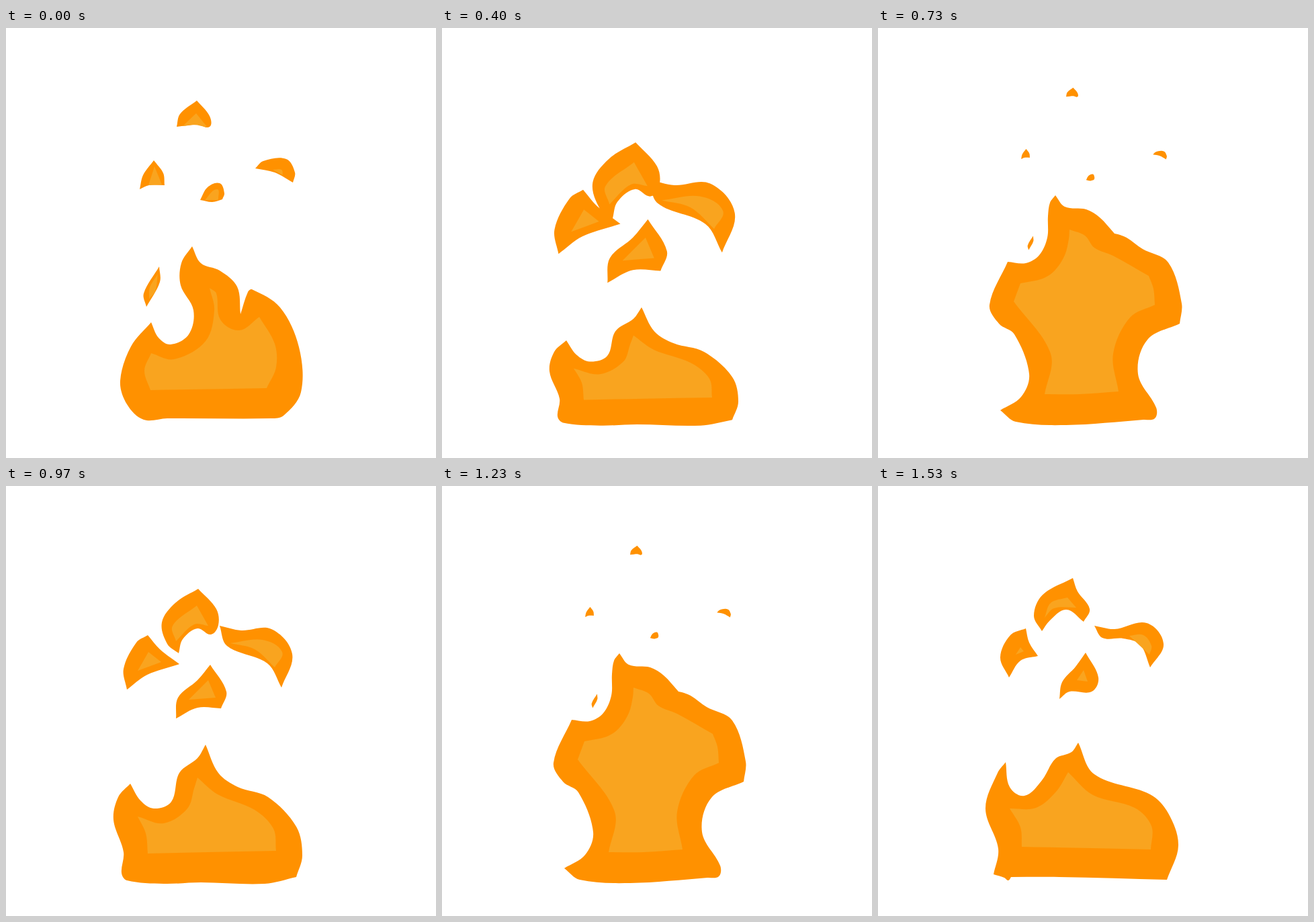
Animation of 640 by 640 pixels, one loop 1560 ms. Source, as an HTML page:

```html
<!DOCTYPE html>
<html lang="en">
<head>
<meta charset="utf-8">
<title>Fire</title>
<style>
html, body { margin: 0; height: 100%; overflow: hidden; background: #fff; }
svg { display: block; width: 100%; height: 100%; }
</style>
</head>
<body>
<svg viewBox="0 0 640 640">
  <path id="edge" fill="#ff9100"/>
  <path id="core" fill="#f9a41f"/>
</svg>
<script>
const LOOP = 1560, POSES = 13;

// Points "x,y"; a "!" marks a sharp corner, kept as a doubled point.
const points = text => text.split(' ').flatMap(token => {
  const p = token.replace('!', '').split(',').map(Number);
  return token.endsWith('!') ? [p, p] : [p];
});
const shape = (edge, core) => [points(edge), points(core)];

const wide = shape(
  '277,325! 290,350 318,361 344,385 349,426! 360,393 366,389 408,416 436,475 439,542 413,577 395,581 240,581 205,583 180,560 170,525 186,474 216,438! 227,461 245,471 272,456 279,420 260,383 261,350',
  '303,387! 313,395 319,434 347,450 377,430! 400,470 402,505 388,536! 215,539! 206,510 216,484! 250,493 297,466 310,420');
const rising = shape(
  '273,311! 293,335 304,343 334,357 352,392! 357,364 365,362 402,381 424,400 445,463 445,495! 441,527 428,548 407,572 406,585 390,586 280,585 205,588 192,578! 190,558 180,527 175,500 176,477 183,459 220,416! 230,440 249,446 273,420 256,375 259,345',
  '287,368! 311,375 325,407 348,419 376,400! 400,428 406,470! 403,505 390,523 376,541! 310,540 226,544! 216,508 210,483! 218,461! 258,468 283,458 303,430 300,395');
const tall = shape(
  '264,249! 278,266 310,270 330,282 352,306! 357,307 370,312 394,329 432,349 452,410 449,440! 401,464 387,515 414,565 412,581 395,583 280,591 205,586 182,569! 213,549 225,515 203,456 180,440 166,412 193,348! 220,350 240,338 252,312 253,280 256,260',
  '285,300! 308,309 322,327 350,339 403,369! 410,388 412,412! 375,431 350,485 353,524 358,541! 300,545 248,545! 257,485 202,407! 212,380! 245,373 263,361 278,338 284,314'.replace('353,524 ', ''));
const necked = shape(
  '265,238! 279,253 315,263 345,285 362,298 408,318 436,352 444,392 449,415 446,435! 413,432 388,442 369,490 382,530 414,554 418,570 414,585! 370,587 310,587 265,582 214,584 186,575 180,551! 200,560 216,551 237,493 222,455 180,424 165,378 176,340 196,318! 201,334 215,338 250,313 248,275',
  '283,289! 312,299 341,323 396,352! 406,394! 362,410 333,475 355,544! 290,540 256,538! 269,485 243,426 204,397! 201,367! 255,356 283,315');
const stump = shape(
  '297,385! 316,427 345,448 390,463 432,507 441,550 432,582! 385,592 290,590 235,592 180,587 172,576 175,545 160,497 167,463 185,443! 200,468 220,480 246,470 258,427 285,405',
  '285,434! 315,459 370,482 398,510 402,543! 300,545 211,547! 208,517 196,492! 235,502 270,480 280,450');
const horned = shape(
  '298,382! 322,429 405,459 432,487 447,535 430,586! 270,582 198,582! 194,587 188,583 172,578! 179,540 160,480 178,427 190,411! 196,448 218,461 244,438 264,406 288,396',
  '283,426! 320,460 382,479 407,506 406,541! 214,537! 212,508 196,480! 235,479 265,455');

const chunks = [
  shape('286,153! 313,183 316,207 305,221 285,212 263,228 257,249! 240,235 232,203 252,174', '284,178! 301,208! 280,206 253,231! 248,208'),
  shape('211,222! 229,243 258,265! 210,281 180,303! 175,272 194,233', '212,247! 231,262! 196,275!'),
  shape('318,208! 350,215 395,213 426,250 410,300! 389,264 329,238', '334,234! 382,229 411,247 400,270! 370,243'),
  shape('304,266! 328,306 320,331! 285,330 253,346! 256,315 285,289', '301,289! 312,315! 272,318!')
];
const shards = [
  shape('290,137! 297,157 315,183 306,202! 280,184 255,201 244,216! 232,193 245,162', '282,166! 295,181! 262,182 248,196! 257,174'),
  shape('220,212! 225,233 238,253! 212,260 195,285! 182,255 197,222', '212,240! 217,246! 205,251!'),
  shape('322,208! 352,213 400,204 425,235 405,270! 390,236 365,227 334,226', '374,223! 395,222 407,238 404,251!'),
  shape('309,248! 328,285 318,306 285,306 270,317! 274,292 294,269', '306,274! 312,291! 296,289!')
];
// Each spark ends with its drift per pose.
const sparks = [
  [...shape('284,108! 303,131 303,147 285,144 254,147! 259,128', '283,127! 300,148! 280,144 263,146!'), 2, -6.4],
  [...shape('220,197! 234,216 236,234! 213,234 199,240! 204,219', '221,206! 232,233! 212,234!'), 0.4, -6.2],
  [...shape('371,209! 383,198 417,195 430,215 427,230! 400,215', '397,211! 410,211 412,219!'), 3.8, -4.6],
  [...shape('289,256! 300,237 318,231 325,246 322,255! 307,259', '296,256! 314,240 316,256!'), 1.8, -4.5],
  [...shape('228,355! 229,378 209,415! 205,395', '226,366! 222,392 213,403! 214,386'), 2, -13]
];

const warp = (pair, fn) => pair.map(list => list.map(([x, y]) => fn(x, y)));

const blend = (a, b, k) => a.map((list, i) => list.map(([x, y], j) =>
  [x + (b[i][j][0] - x) * k, y + (b[i][j][1] - y) * k]));

// Scales a piece about the middle of its edge, then moves it.
function place([edge, core], scale, dx, dy) {
  const [cx, cy] = [0, 1].map(axis => {
    const values = edge.map(p => p[axis]);
    return (Math.min(...values) + Math.max(...values)) / 2;
  });
  return warp([edge, core], (x, y) => [cx + (x - cx) * scale + dx, cy + (y - cy) * scale + dy]);
}

const pinch = k => warp(necked, (x, y) => [
  303 + (x - 303) * (1 - 0.25 * k * Math.exp(-(((y - 480) / 90) ** 2))),
  y - 17 * k * Math.min(1, Math.max(0, (590 - y) / 100))
]);

const squash = k => warp(stump, (x, y) => [x, 590 + (y - 590) * k]);

function bodyAt(pose) {
  if (pose === 0) return wide;
  if (pose <= 5) return blend(rising, tall, (pose - 1) / 4);
  if (pose <= 8) return pinch(pose - 6);
  return pose < 12 ? squash(1 - 0.15 * (11 - pose)) : horned;
}

function piecesAt(pose) {
  if (pose < 8) {
    return sparks.map(([edge, core, dx, dy]) =>
      place([edge, pose < 5 ? core : []], 0.81 ** pose, dx * pose, dy * pose));
  }
  if (pose === 8) return [];
  const early = 11 - pose;
  return pose < 12 ? chunks.map(piece => place(piece, 1 + 0.18 * early, 0, 26 * early)) : shards;
}

// Smooth closed path through the points, with handles a third of each chord.
function smooth(list) {
  const at = i => list[(i + list.length) % list.length];
  const handle = (i, reach) => {
    const [px, py] = at(i - 1), [x, y] = at(i), [nx, ny] = at(i + 1);
    const k = reach / (Math.hypot(nx - px, ny - py) || 1);
    return [x + (nx - px) * k, y + (ny - py) * k];
  };
  const curves = list.map((p, i) => {
    const q = at(i + 1), reach = Math.hypot(q[0] - p[0], q[1] - p[1]) / 3;
    return `C${handle(i, reach)} ${handle(i + 1, -reach)} ${q}`;
  });
  return list.length ? `M${list[0]}${curves.join('')}Z` : '';
}

const drawings = Array.from({ length: POSES }, (_, pose) => {
  const pairs = [bodyAt(pose), ...piecesAt(pose)];
  return [0, 1].map(layer => pairs.map(pair => smooth(pair[layer])).join(''));
});

const layers = ['edge', 'core'].map(id => document.getElementById(id));
const start = performance.now();

// 25 poses a second, shown on a 30 per second clock.
function loop() {
  const time = (performance.now() - start) % LOOP;
  const tick = Math.floor((time + 4) * 0.03);
  const drawing = drawings[Math.floor(tick * 5 / 6 + 0.4) % POSES];
  layers.forEach((path, i) => path.setAttribute('d', drawing[i]));
  requestAnimationFrame(loop);
}
loop();
</script>
</body>
</html>
```
